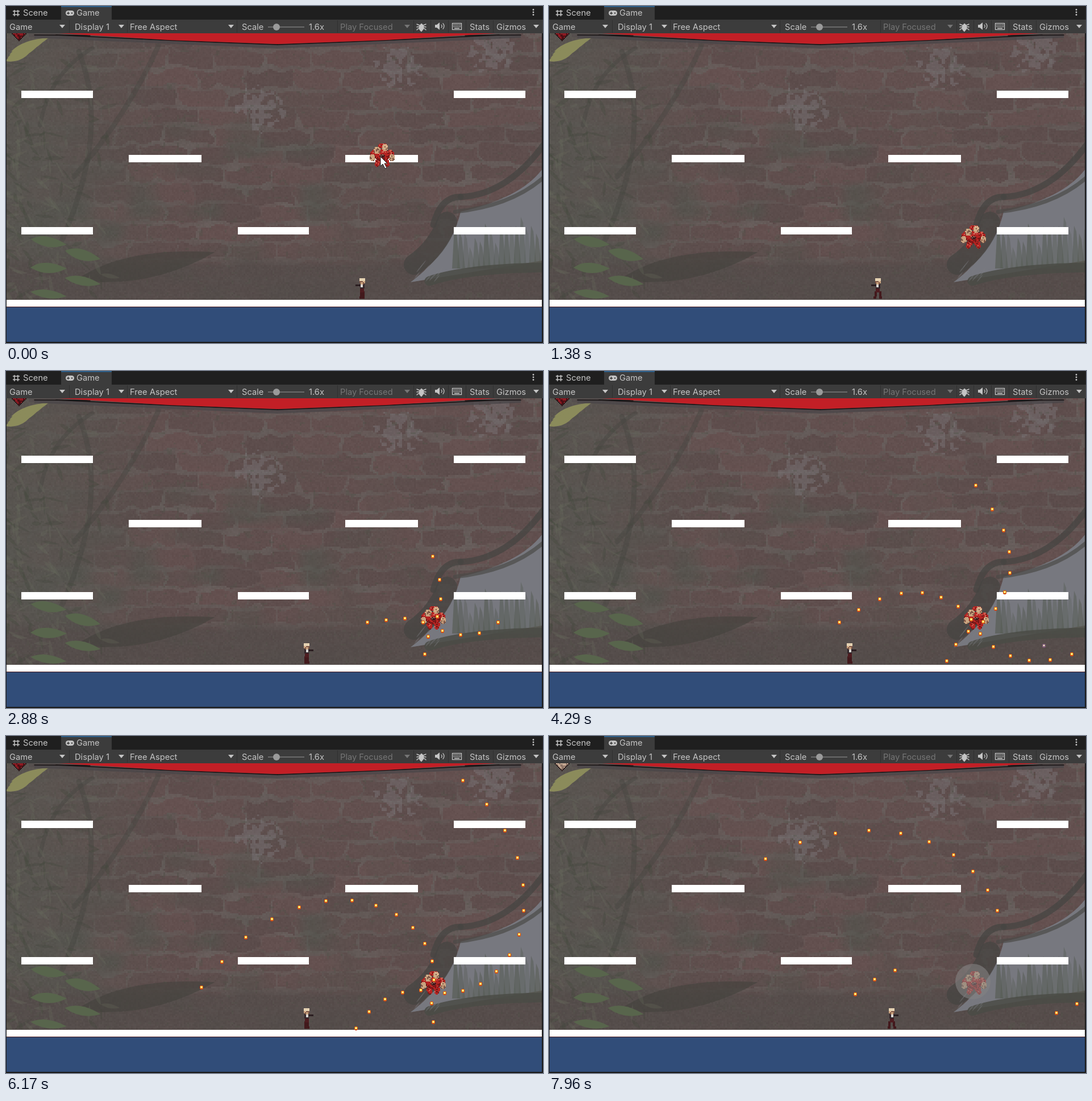
An HTML page with a canvas for the animation above (8 s loop, 945 by 593 pixels).

```html
<!DOCTYPE html>
<html lang="en">
<head>
<meta charset="utf-8">
<title>Game view</title>
<style>
html, body { margin: 0; width: 100%; height: 100%; overflow: hidden; background: #191919; }
canvas { display: block; width: 100vw; height: 100vh; }
</style>
</head>
<body>
<canvas id="stage" width="945" height="593"></canvas>
<script>
const W = 945, H = 593, LOOP = 8000;
const stage = document.getElementById('stage').getContext('2d');
const scene = document.createElement('canvas');
scene.width = W;
scene.height = H;
let c = scene.getContext('2d');

const clamp = (v, a = 0, b = 1) => Math.min(b, Math.max(a, v));
const ramp = (t, from, to) => clamp((t - from) / (to - from));
const mix = (a, b, k) => a.map((v, i) => v + (b[i] - v) * k);

function hash(x, y) {
  let n = Math.imul(x, 374761393) + Math.imul(y, 668265263);
  n = Math.imul(n ^ n >>> 13, 1274126177);
  return ((n ^ n >>> 16) >>> 0) / 4294967296;
}

function noise(x, y) {
  const ix = Math.floor(x), iy = Math.floor(y);
  const ease = v => v * v * (3 - 2 * v);
  const fx = ease(x - ix), fy = ease(y - iy);
  const top = hash(ix, iy) * (1 - fx) + hash(ix + 1, iy) * fx;
  const low = hash(ix, iy + 1) * (1 - fx) + hash(ix + 1, iy + 1) * fx;
  return top + (low - top) * fy;
}

function rect(color, x, y, w, h) {
  c.fillStyle = color;
  c.fillRect(x, y, w, h);
}

function disc(color, x, y, r) {
  c.fillStyle = color;
  c.beginPath();
  c.arc(x, y, r, 0, 7);
  c.fill();
}

function poly(color, ...pts) {
  c.fillStyle = color;
  c.beginPath();
  for (const p of pts) c.lineTo(...p);
  c.fill();
}

// One curved stroke: start, control point, end
function brush(color, width, a, bend, b) {
  c.strokeStyle = color;
  c.lineWidth = width;
  c.lineCap = 'round';
  c.beginPath();
  c.moveTo(...a);
  c.quadraticCurveTo(...bend, ...b);
  c.stroke();
}

function leaf(color, x, y, len, thick, turn) {
  c.save();
  c.translate(x, y);
  c.rotate(turn);
  c.fillStyle = color;
  c.beginPath();
  c.moveTo(-len / 2, 0);
  c.quadraticCurveTo(-len / 8, -thick, len / 2, 0);
  c.quadraticCurveTo(0, thick, -len / 2, 0);
  c.fill();
  c.restore();
}

// ---------- wall ----------
const PALE = [[690, 105], [850, 75], [445, 180]];

function wallColor(x, y) {
  const wx = x + (noise(x / 13, y / 13) - 0.5) * 13;
  const wy = y + (noise(x / 22 + 50, y / 12) - 0.5) * 12 + (noise(x / 150, y / 90) - 0.5) * 12;
  const row = Math.floor((wy - 43) / 33), fy = wy - 43 - row * 33;
  const u = wx + (row & 1) * 42 + hash(row, 7) * 30;
  const col = Math.floor(u / 86), fx = u - col * 86;
  const worn = noise(x / 45 + 9, y / 25 + 4);
  let rgb = mix([91, 76, 75], [101, 81, 80], hash(col, row + 90));
  if (fy < 3 + worn * 8 || fx < 1 + worn * 6) rgb = mix(rgb, [104, 98, 95], 0.2 + worn * 0.55);
  const moss = clamp((noise(x / 60 + 30, y / 36) - 0.4) * 2) * ramp(y, 130, 330) * ramp(x, 800, 450);
  rgb = mix(rgb, [82, 82, 76], moss);
  rgb = mix(rgb, [87, 85, 80], ramp(x, 290, 50) * 0.8);
  rgb = mix(rgb, [84, 76, 74], ramp(y, 436, 458) * 0.85);
  const pale = PALE.reduce((sum, [px, py]) => sum + Math.exp(-((x - px) ** 2 + (y - py) ** 2) / 2600), 0);
  if (pale * noise(x / 7, y / 8) > 0.4) rgb = mix(rgb, [122, 117, 120], 0.45);
  if (noise(x / 6 + 70, y / 6) > 0.86) rgb = mix(rgb, [82, 82, 73], 0.4);
  const grain = (hash(x, y) - 0.5) * 6;
  return `rgb(${rgb.map(v => Math.round(v + grain))})`;
}

function paintPlants() {
  const stem = 'rgba(69,68,63,.4)';
  brush(stem, 7, [152, 74], [75, 120], [60, 210]);
  brush(stem, 9, [128, 80], [185, 220], [95, 420]);
  brush(stem, 9, [268, 70], [215, 190], [120, 300]);
  leaf('rgba(67,65,60,.6)', 245, 458, 250, 42, -0.2);
  for (let i = 0; i < 170; i++) {
    const x = hash(i, 1) ** 1.7 * 190, y = 95 + hash(i, 2) * 420;
    const color = hash(i, 3) < 0.55 ? 'rgba(66,70,60,.32)' : 'rgba(104,106,92,.28)';
    leaf(color, x, y, 14 + hash(i, 4) * 26, 3 + hash(i, 5) * 5, (hash(i, 6) - 0.3) * 2.4);
  }
  for (let i = 0; i < 5; i++)
    leaf('#58654c', 75 + (i % 2) * 60, 415 + i * 23, 64, 11 + hash(i, 8) * 9, hash(i, 9) * 0.3);
  for (let i = 0; i < 4; i++) leaf('#8b8b5b', 42 - i * 7, 68 + i * 7, 70 - i * 8, 13, -0.35);
}

function paintOpening() {
  c.fillStyle = '#77787f';
  c.beginPath();
  c.moveTo(943, 288);
  c.quadraticCurveTo(905, 338, 800, 362);
  c.quadraticCurveTo(785, 430, 712, 486);
  c.lineTo(943, 448);
  c.fill();
  for (let i = 0; i < 18; i++) {
    const x = 785 + i * 9, top = 370 + hash(i, 31) * 55;
    poly(`rgba(86,92,84,${0.25 + hash(i, 32) * 0.45})`, [x, 462], [x + 4, top], [x + 8, top + 10], [x + 14, 462]);
  }
  const shade = 'rgba(70,69,66,.75)';
  brush(shade, 11, [952, 236], [885, 332], [800, 336]);
  brush(shade, 11, [800, 336], [765, 335], [752, 385]);
  brush('rgba(76,75,72,.7)', 7, [948, 300], [890, 352], [790, 362]);
  brush(shade, 36, [776, 380], [760, 425], [718, 455]);
  brush('rgba(74,76,70,.85)', 17, [745, 484], [810, 462], [950, 460]);
  for (let i = 0; i < 12; i++)
    leaf('rgba(124,125,130,.4)', 720 + hash(i, 41) * 48, 448 + hash(i, 42) * 32, 18, 2, -0.9);
}

function paintBanner() {
  rect('rgba(84,78,78,.7)', 40, 48, 865, 7);
  for (const s of [-1, 1]) {
    const at = (dx, y) => [478 + s * dx, y];
    poly('rgba(74,70,72,.75)', at(0, 66), at(428, 50), at(428, 56), at(0, 75));
    brush('#151011', 1.6, at(428, 51), at(370, 51), at(330, 52));
    brush('#151011', 1.6, at(390, 51), at(190, 61), at(0, 68));
    poly('#c21f26', at(0, 48), at(385, 48), at(190, 60), at(0, 67));
  }
}

function paintWall() {
  for (let y = 48; y < 517; y += 3)
    for (let x = 1; x < 943; x += 3) rect(wallColor(x, y), x, y, 3, 3);
  c.save();
  c.beginPath();
  c.rect(1, 48, 942, 469);
  c.clip();
  paintPlants();
  paintOpening();
  paintBanner();
  c.restore();
}

// ---------- editor frame ----------
const INK = '#c4c4c4', DIM = '#757575', BAR = '#3c3c3c';

function label(text, x, y = 41.5, color = INK) {
  c.fillStyle = color;
  c.font = '14.7px Inter, sans-serif';
  c.fillText(text, x, y);
}

const arrow = (x, color = INK) => poly(color, [x - 5, 33], [x + 5, 33], [x, 39]);

function paintIcons() {
  for (const d of [0, 6]) {
    rect(INK, 14 + d, 7, 1.5, 11);
    rect(INK, 12, 9 + d - 0.5, 12, 1.5);
  }
  c.fillStyle = INK;
  c.beginPath();
  c.roundRect(105, 8, 15, 9, 4.5);
  c.fill();
  rect(BAR, 107, 12, 5, 1.5);
  rect(BAR, 108.8, 10, 1.5, 5);
  disc(BAR, 116, 12.5, 1.2);
  for (let i = 0; i < 3; i++) disc(INK, 928, 6.5 + i * 4.5, 1.4);

  leaf(INK, 731, 38, 15, 9, Math.PI / 2);
  for (const s of [-1, 1])
    for (let d = -5; d <= 5; d += 5) brush(INK, 1.4, [731 + s * 3, 37 + d * 0.6], [731 + s * 6, 36 + d * 0.6], [731 + s * 8, 37 + d]);

  rect(INK, 755, 33, 4, 5);
  poly(INK, [758, 33], [763, 29], [763, 42], [758, 38]);
  for (const r of [3, 6]) brush(INK, 1.3, [763 + r, 35.5 - r * 0.8], [764 + r * 1.5, 35.5], [763 + r, 35.5 + r * 0.8]);
  c.strokeRect(785.5, 30.5, 16, 11);
  for (let i = 0; i < 8; i++) rect(INK, 787.5 + (i % 4) * 3.4, 32.5 + (i >> 2) * 3, 2, 1.6);
  rect(INK, 789, 38.5, 9, 1.5);
}

function paintFrame() {
  rect('#1f1f1f', 0, 0, W, 24);
  rect(BAR, 97, 0, 89, 24);
  rect('#2c5d87', 97, 0, 89, 2);
  rect(BAR, 0, 24, W, 24);
  for (const x of [111, 213, 406, 583, 717, 747, 778, 809, 857]) rect('#303030', x, 25, 1, 22);
  label('Scene', 30, 17);
  label('Game', 124, 17);
  label('Game', 6);
  label('Display 1', 121);
  label('Free Aspect', 218);
  label('Scale', 415);
  label('1.6x', 533);
  label('Play Focused', 588, 41.5, DIM);
  label('Stats', 816);
  label('Gizmos', 863);
  for (const x of [99, 203, 396, 933]) arrow(x);
  arrow(706, DIM);
  rect('#6a6a6a', 461, 36, 64, 2);
  disc('#9a9a9a', 476, 37, 6);
  paintIcons();
}

function paintScene() {
  rect('#191919', 0, 0, W, H);
  paintWall();
  paintFrame();
  rect('#314d79', 1, 530, 942, 61);
  rect('#fff', 1, 517, 942, 12);
  rect('#4d1d20', 1, 529, 942, 1);
  for (const x of [27, 788]) for (const y of [149, 389]) rect('#fff', x, y, 126, 13);
  for (const x of [216, 597]) rect('#fff', x, 262, 128, 13);
  rect('#fff', 408, 389, 125, 13);
}

// ---------- moving parts ----------
const FIRE = 1580, EVERY = 363, VOLLEYS = 14, SPEED = 0.0887;
const SHIELD = 7300, HIT = 7550;
const RED = '#b52422', SKIN = '#c9a27e', LIGHT = '#e5d2b2', DARK = '#42191c';

const enemyX = t => 662 + 189 * ramp(t, 0, 800) - 104 * ramp(t, 1010, 1370) + 5 * ramp(t, 1400, 1500);
const enemyY = t => Math.min(435, 263 + 0.104 * t);
const heroX = t => 627 - 144 * ramp(t, 985, 1900) ** 1.3 + 46 * ramp(t, 2000, 2200) + 74 * ramp(t, 7490, 7960);

// Ellipse of 2px cells with mottled shading
function ball(color, x, y, rx, ry) {
  for (let j = -ry; j < ry; j += 2)
    for (let i = -rx; i < rx; i += 2) {
      if (((i + 1) / rx) ** 2 + ((j + 1) / ry) ** 2 > 1) continue;
      rect(color, x + i, y + j, 2, 2);
      const tone = hash(x + i, y + j) - 0.25 * j / ry;
      if (tone < 0.25) rect('rgba(50,10,12,.5)', x + i, y + j, 2, 2);
      if (tone > 0.95) rect('rgba(255,220,180,.35)', x + i, y + j, 2, 2);
    }
}

function at(x, y, flip, paint) {
  c.save();
  c.translate(Math.round(x), Math.round(y));
  if (flip) c.scale(-1, 1);
  paint();
  c.restore();
}

function drawEnemy(x, y, spread) {
  at(x, y, false, () => {
    for (const s of [-1, 1]) {
      ball(RED, s * 7, 11, 5, 5);
      ball(RED, s * (5 + spread), 16, 4, 4);
      ball(RED, s * 14, -3, 7, 7);
      ball(SKIN, s * 17, 4, 5, 6);
    }
    ball(RED, 0, 0, 13, 11);
    ball(SKIN, -9, -9, 6, 6);
    ball(RED, 1, -17, 8, 4);
    ball(SKIN, 5, -14, 5, 6);
    ball(DARK, 0, 1, 5, 3);
  });
}

function drawHero(x, t) {
  const moving = t > 985 && t < 1900 || t > 2000 && t < 2200 || t > 7490;
  const swing = moving ? Math.round(Math.sin(t / 70) * 3) : 0;
  at(x, 479, t < 2000, () => {
    for (const s of [-1, 1]) {
      rect(DARK, s * (2 + swing) - 2, 23, 4, 9);
      rect(DARK, s * (2 + swing * 1.5) - 2, 32, 5, 4);
    }
    rect('#4d1c20', -3, 18, 7, 7);
    rect('#32262a', -4, 10, 8, 8);
    rect('#d8d5d2', -1, 11, 4, 5);
    rect('#2a1d20', 3, 11, 9, 3);
    ball(SKIN, 0, 6, 5, 5);
    rect(LIGHT, -5, 0, 10, 5);
  });
}

function drawShot(x, y, outer = '#cf4a1a', inner = '#ffd53d') {
  x = Math.round(x);
  y = Math.round(y);
  rect(outer, x - 3, y - 2, 6, 5);
  rect(outer, x - 2, y - 3, 4, 7);
  rect(inner, x - 2, y - 2, 4, 4);
  rect('#fff3b0', x - 1, y - 1, 2, 2);
}

// Four arms turning a little with each volley
function drawShots(t) {
  for (let k = 0; k < VOLLEYS; k++) {
    const born = FIRE + k * EVERY, age = t - born;
    if (age < 0 || age > 5000) continue;
    const d = age * SPEED, cy = enemyY(born) + 14.5;
    for (let arm = 0; arm < 4; arm++) {
      const a = (k * 8.07 + arm * 90) * Math.PI / 180;
      const x = 751 + d * Math.cos(a), y = cy + d * Math.sin(a);
      const struck = t > HIT && y > 479 && x < heroX(t);
      if (y < 514 && !struck) drawShot(x, y);
    }
  }
}

function drawHeart(lost) {
  const [fill, dim] = lost ? ['#c5a892', '#8d7365'] : ['#8e1a22', '#4c0f14'];
  for (let y = 0; y < 7; y++)
    for (let x = y - 6; x <= 6 - y; x++) {
      const edge = Math.abs(x) > 5 - y;
      rect(edge ? '#241516' : hash(x + 40, y) > 0.45 ? fill : dim, 22 + x * 2, 48 + y * 2, 2, 2);
    }
}

function drawCursor(x, y) {
  const outline = [[0, 0], [0, 17], [4, 13], [8, 21], [11, 20], [7, 12], [12, 12]].map(([i, j]) => [x + i, y + j]);
  poly('#fff', ...outline);
  c.closePath();
  c.strokeStyle = '#222';
  c.lineWidth = 1;
  c.stroke();
}

function draw(t) {
  c = stage;
  c.drawImage(scene, 0, 0);
  c.save();
  c.beginPath();
  c.rect(1, 48, 942, 482);
  c.clip();
  drawHeart(t > HIT);
  const shielded = t > SHIELD;
  drawEnemy(enemyX(t) - (shielded ? 4 : 0), enemyY(t), t < 1600 || shielded ? 4 : 1);
  if (shielded) disc('rgba(132,130,130,.6)', 746, 432, 31);
  drawHero(heroX(t), t);
  drawShots(t);
  if (t > 4230 && t < 4350) drawShot(871, 483, '#79566f', '#a182a0');
  if (t < 100) drawCursor(659, 265);
  c.restore();
}

paintScene();
const start = performance.now();
function tick() {
  draw((performance.now() - start) % LOOP);
  requestAnimationFrame(tick);
}
tick();
</script>
</body>
</html>
```
